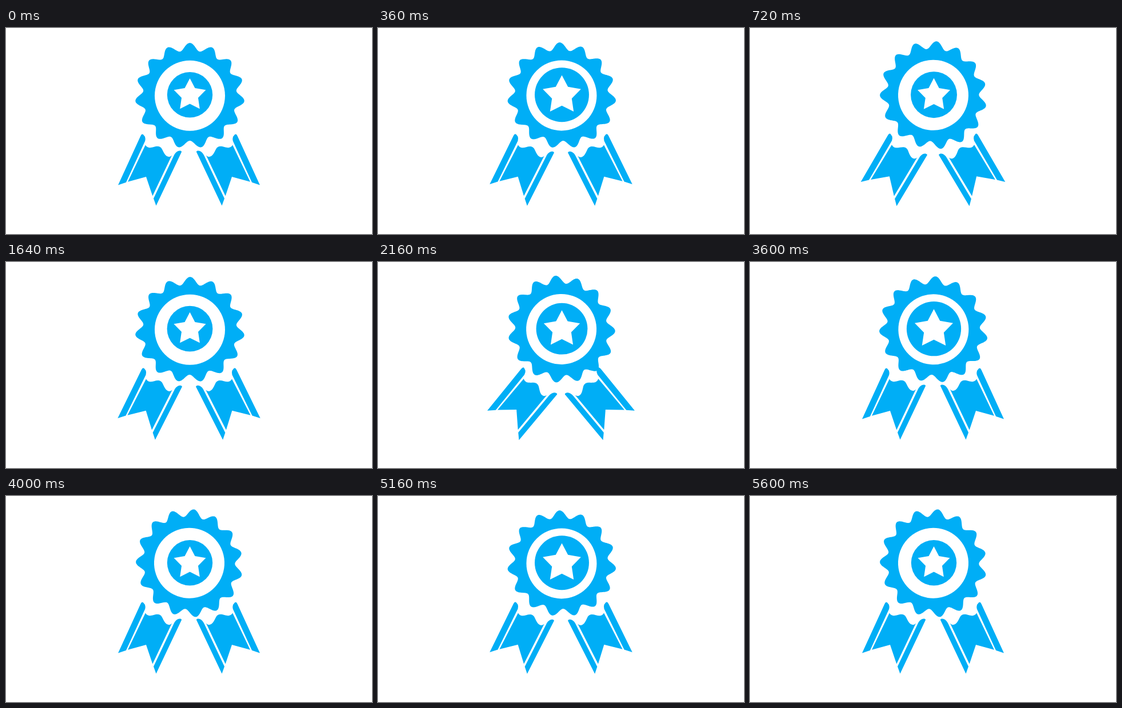
An HTML page with a canvas that plays this animation: 640 px wide and 360 px high, repeating every 6.32 s.

```html
<!DOCTYPE html>
<html lang="en">
<head>
<meta charset="utf-8">
<title>Award rosette</title>
<style>
html, body { margin: 0; width: 100%; height: 100%; overflow: hidden; background: #fff; }
canvas { display: block; }
</style>
</head>
<body>
<canvas id="stage" width="640" height="360"></canvas>
<script>
const ctx = document.getElementById('stage').getContext('2d');
const BLUE = '#00aef6', WHITE = '#fff';
const LOOP = 6320, STEP = 40, CYCLE_STEPS = 40, MOVE_STEPS = 20;
const TURN = 54, SWING = 16, PULSE = 0.2, TEETH = 15;
const rad = deg => deg * Math.PI / 180;

const easeInOut = x => (1 - Math.cos(Math.PI * x)) / 2;

// Out and back within one unit of time
const bounce = x => easeInOut(1 - Math.abs(1 - 2 * x));

function circle(x, y, r, color) {
  ctx.fillStyle = color;
  ctx.beginPath();
  ctx.arc(x, y, r, 0, 2 * Math.PI);
  ctx.fill();
}

function polygon(count, point, color) {
  ctx.fillStyle = color;
  ctx.beginPath();
  for (let i = 0; i < count; i++) ctx.lineTo(...point(i));
  ctx.closePath();
  ctx.fill();
}

const ribbon = new Path2D(`
  M196 274.5 L235.2 189 Q237.5 184 240 186.3 L243 190 Q244.2 193.5 243.2 197.5 L210 269.7 Z
  M213 268.7 L243.8 204.6 C247.5 210.5 252 209.5 258 208 C265 205.8 270 206 273 212
  C277 220 279 223.5 283.5 224.8 C286 225.4 288 224.4 290 222.4 L256.3 293.5 L245 260 Z
  M258 298 L293.5 223 C296 217.5 300.5 213.5 305 214.6 Q308 215.4 306.6 217.5 L262.5 310.5 Z`);

function drawRibbon(angle, mirrored) {
  ctx.save();
  if (mirrored) {
    ctx.translate(640, 0);
    ctx.scale(-1, 1);
  }
  ctx.translate(251.5, 247.8);
  ctx.rotate(angle);
  ctx.translate(-251.5, -247.8);
  ctx.fillStyle = BLUE;
  ctx.fill(ribbon);
  ctx.restore();
}

// Turns about a point slightly off the centre of its ring
function drawRosette(angle) {
  ctx.save();
  ctx.translate(322, 116.7);
  ctx.rotate(angle);
  ctx.translate(-0.5, 1.5);
  polygon(720, i => {
    const a = rad(i / 2);
    const r = 87 + 6.8 * Math.cos(TEETH * a);
    return [1.02 * r * Math.sin(a), -0.982 * r * Math.cos(a)];
  }, BLUE);
  circle(0, 0, 61.5, WHITE);
  ctx.restore();
}

function drawStar(scale) {
  ctx.save();
  ctx.translate(321.5, 116.7);
  ctx.scale(scale, scale);
  circle(0, 0, 39.7, BLUE);
  polygon(10, i => {
    const r = i % 2 ? 15.2 : 29.4;
    const a = rad(36 * i);
    return [r * Math.sin(a), 0.7 - r * Math.cos(a)];
  }, WHITE);
  ctx.restore();
}

function progress(ms) {
  const n = Math.floor((ms % LOOP) / STEP);
  // The second cycle skips its opening pose
  if (n === CYCLE_STEPS) return 1;
  return Math.min(1, (n % CYCLE_STEPS) / MOVE_STEPS);
}

function draw(ms) {
  const p = progress(ms);
  const swing = rad(SWING) * bounce((2 * p) % 1);
  ctx.fillStyle = WHITE;
  ctx.fillRect(0, 0, 640, 360);
  drawRibbon(swing, false);
  drawRibbon(swing, true);
  drawRosette(rad(TURN) * easeInOut(p));
  drawStar(1 + PULSE * bounce(p));
}

const start = performance.now();
function tick() {
  draw(performance.now() - start);
  requestAnimationFrame(tick);
}
tick();
</script>
</body>
</html>
```
